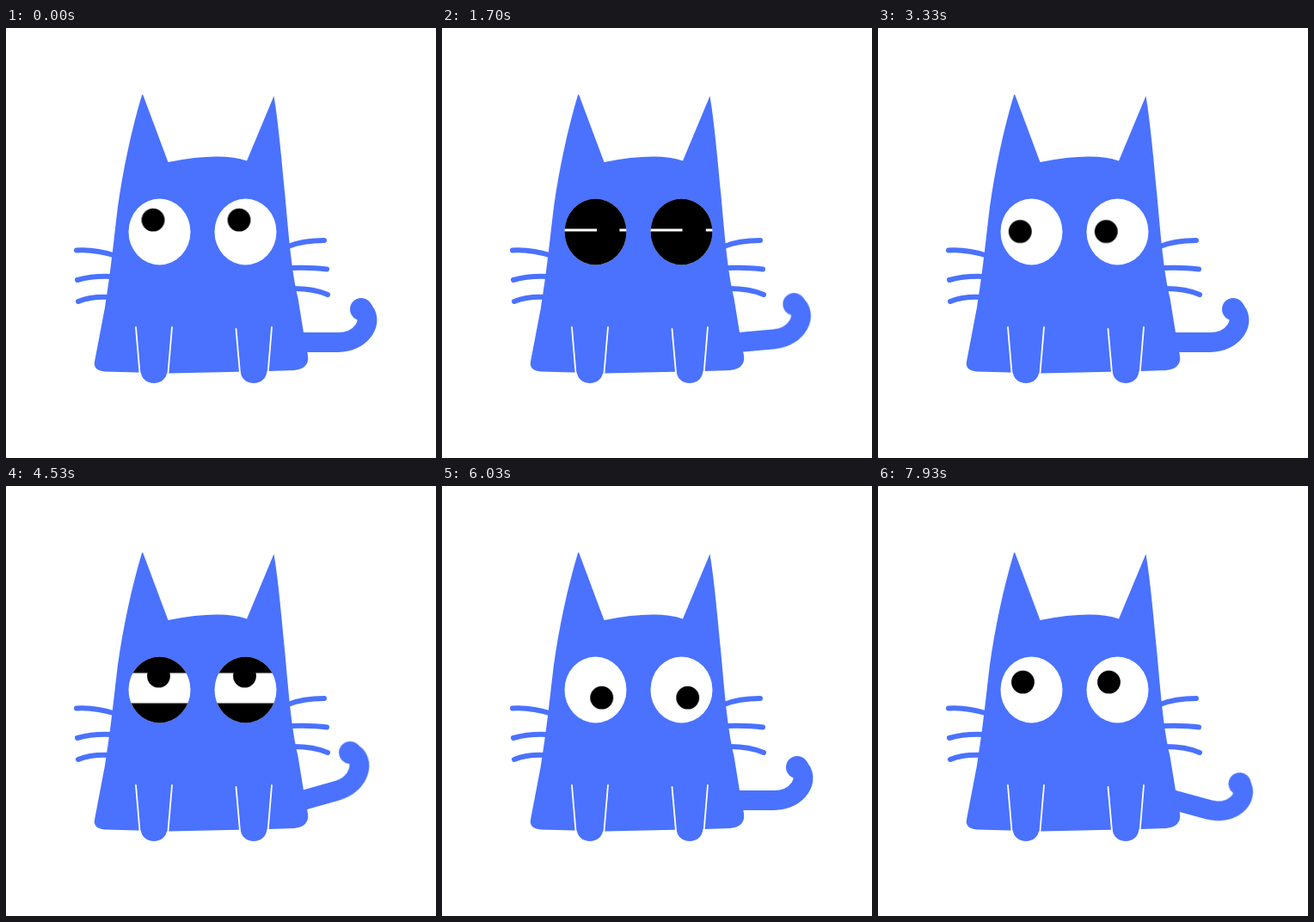
An HTML page that plays this animation: 500x500 px, repeating every 8 s.

```html
<!DOCTYPE html>
<html lang="en">
<head>
<meta charset="utf-8">
<title>Blue cat</title>
<style>
  html, body { margin: 0; width: 100%; height: 100%; overflow: hidden; background: #fff; }
  svg { display: block; width: 100%; height: 100%; }
  .fur { fill: #4a72ff; }
  .line { fill: none; stroke: #4a72ff; stroke-linecap: round; }
  .leg { fill: none; stroke: #fff; stroke-width: 1.8; stroke-linecap: round; }

  .tail { transform-origin: 345px 365px; animation: wag 8s ease-in-out infinite; }
  .pupils { animation: look 8s ease-in-out infinite; }
  .lid { animation: blink 1s ease-in-out infinite; }
  .upper { --open: -50px; }
  .lower { --open: 50px; }

  /* the wag repeats every 3 s, cut off at 8 s */
  @keyframes wag {
    0%, 9.375%, 37.5%, 46.875%, 75%, 84.375% { transform: rotate(0deg); }
    18.75%, 56.25%, 93.75% { transform: rotate(-16deg); }
    25%, 62.5%, 100% { transform: rotate(16.5deg); }
    31.875%, 69.375% { transform: rotate(-15.5deg); }
  }

  /* one glance per second: a third moving, the rest held */
  @keyframes look {
    0% { transform: translate(-7.5px, -12px); }
    4.167%, 12.5% { transform: translate(10px, -10px); }
    16.667%, 25% { transform: translate(14.5px, 0); }
    29.167%, 37.5% { transform: translate(0, 13px); }
    41.625%, 50% { transform: translate(-13.2px, 1.4px); }
    54.167%, 62.5% { transform: translate(-1px, -14.2px); }
    66.667%, 75% { transform: translate(7.5px, 11px); }
    79.167%, 87.5% { transform: translate(-10px, 11px); }
    91.667%, 100% { transform: translate(-10px, -7.2px); }
  }

  @keyframes blink {
    0%, 33.333%, 100% { transform: translateY(var(--open)); }
    66.667% { transform: translateY(0); }
  }
</style>
</head>
<body>
<svg viewBox="0 0 500 500">
  <clipPath id="sockets">
    <ellipse cx="178.5" cy="237" rx="36" ry="38.5"/>
    <ellipse cx="278.5" cy="237" rx="36" ry="38.5"/>
  </clipPath>

  <g class="tail">
    <path class="line" stroke-width="23" d="M342 365.5H386C414 365.5 429 340 414 327"/>
    <circle class="fur" cx="413" cy="327" r="13"/>
  </g>

  <path class="line" stroke-width="6" d="M82 258.500Q103 257 128 265M83 293Q101 288 122 289M84 318Q99 312 120 313
    M328 254Q345 247 370 247M331 279Q355 278 373 280.500M335 303Q358 303 374 310"/>

  <path class="fur" d="M159 77L188.500 156Q250 144 280 154.500L311.500 79
    C317 112 320.500 155 324.500 195C329 245 332 282 339.500 314L346 354L351 381Q353 396 335 398
    L305 399L190 401.500L115 399.500Q101 398 103 388L115 325C123 275 126 240 130 208
    C136 165 146 118 158 78Z"/>

  <path class="fur" d="M151 347L156.500 398C157 418 187 418 187.500 398L193 347Z
    M267 347L272.500 398C273 418 303 418 303.500 398L309 347Z"/>
  <path class="leg" d="M151 348L155.500 401M193 348L188.500 401M267.500 350L272 401M309 348L304.700 400"/>

  <g clip-path="url(#sockets)">
    <rect x="138" y="190" width="182" height="95" fill="#fff"/>
    <g class="pupils">
      <circle cx="178.5" cy="235.2" r="13.4"/>
      <circle cx="278.5" cy="235.2" r="13.4"/>
    </g>
    <rect class="lid upper" x="138" y="175" width="182" height="59.5"/>
    <rect class="lid lower" x="138" y="235.5" width="182" height="60"/>
  </g>
</svg>
</body>
</html>
```
